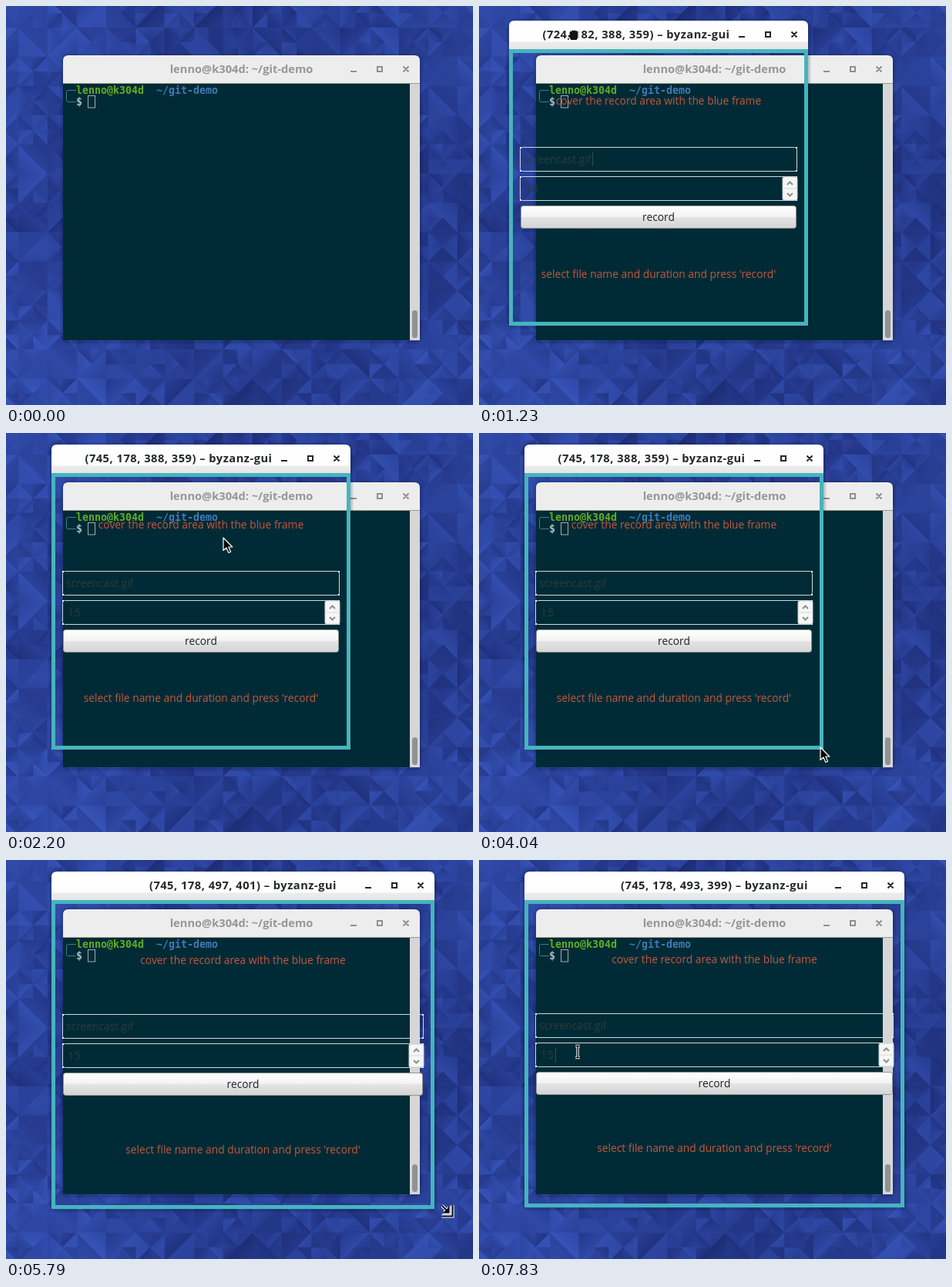
An HTML page with a canvas that plays this animation: 606 px wide and 518 px high, repeating every 8 s.

```html
<!DOCTYPE html>
<html lang="en">
<head>
<meta charset="utf-8">
<title>Screen recorder window</title>
<style>
  html, body { margin: 0; width: 100%; height: 100%; overflow: hidden; background: #2a419c; }
  canvas, svg { position: absolute; left: 0; top: 0; width: 100%; height: 100%; display: block; }
  text { font-family: "Open Sans", "Noto Sans", sans-serif; font-size: 13.8px; white-space: pre; }
  .title { font-size: 14.67px; font-weight: 700; text-anchor: middle; }
  .coords { letter-spacing: .5px; fill: #22282a; }
  .mono { font-family: "DejaVu Sans Mono", monospace; font-size: 13.3px; font-weight: 700; }
  .hint { fill: #c4583c; text-anchor: middle; }
  .entry { fill: #2e3a3c; }
  .line { fill: none; stroke: #cbdadd; }
</style>
</head>
<body>
<canvas id="wall" width="606" height="518"></canvas>
<svg viewBox="0 0 606 518" preserveAspectRatio="none">
  <defs>
    <linearGradient id="push" x2="0" y2="1">
      <stop offset="0" stop-color="#fff"/><stop offset=".48" stop-color="#f3f3f3"/>
      <stop offset=".52" stop-color="#e4e4e4"/><stop offset="1" stop-color="#d4d4d4"/>
    </linearGradient>
    <linearGradient id="bar" x2="0" y2="1">
      <stop offset="0" stop-color="#fff"/><stop offset=".72" stop-color="#fdfdfd"/>
      <stop offset=".76" stop-color="#ececec"/><stop offset="1" stop-color="#e6e6e6"/>
    </linearGradient>
  </defs>
  <g id="term"></g>
  <g id="gui"></g>
  <g id="cursor"></g>
</svg>
<script>
const LOOP = 8000;
const $ = id => document.getElementById(id);

// Wallpaper: right triangles halved at random, each with a soft gradient
function paintWall() {
  const c = $('wall').getContext('2d');
  let seed = 4711;
  const rnd = () => (seed = (seed * 16807) % 2147483647) / 2147483647;
  const light = (x, y) => .48 + .1 * Math.cos(x / 95) * Math.cos(y / 80) - .08 * x / 606;
  const shade = v => `rgb(${27 + 34 * v},${42 + 52 * v},${114 + 88 * v})`;
  const mid = (p, q) => [(p[0] + q[0]) / 2, (p[1] + q[1]) / 2];

  function tri(a, p, q, depth) {
    const m = mid(p, q);
    if (depth > 2 || depth > 0 && rnd() < .6) {
      tri(m, a, p, depth - 1);
      tri(m, q, a, depth - 1);
      return;
    }
    const v = light(...mid(a, m)) + (rnd() - .5) * .4, turn = (rnd() - .5) * .3;
    const g = c.createLinearGradient(...a, ...m);
    g.addColorStop(0, shade(v + turn));
    g.addColorStop(1, shade(v - turn));
    c.fillStyle = c.strokeStyle = g;
    c.lineWidth = .6;
    c.beginPath();
    c.moveTo(...a); c.lineTo(...p); c.lineTo(...q);
    c.closePath(); c.fill(); c.stroke();
  }

  const S = 76;
  for (let y = -10; y < 518; y += S)
    for (let x = -22; x < 606; x += S) {
      const A = [x, y], B = [x + S, y], C = [x + S, y + S], D = [x, y + S];
      if (rnd() < .5) { tri(A, B, D, 4); tri(C, D, B, 4); }
      else { tri(B, C, A, 4); tri(D, A, C, 4); }
    }
}

const rect = (x, y, w, h, attrs) => `<rect x="${x}" y="${y}" width="${w}" height="${h}" ${attrs}/>`;
const text = (x, y, cls, str, attrs = '') => `<text x="${x}" y="${y}" class="${cls}" ${attrs}>${str}</text>`;
const path = (d, attrs) => `<path d="${d}" ${attrs}/>`;
const outlined = (d, width) => path(d, `fill="none" stroke="#fff" stroke-width="${width + 2}"`) +
  path(d, `fill="none" stroke="#0a0a0a" stroke-width="${width}"`);

const shadow = (x, y, w, h) => [1, 2, 3, 4].map(i =>
  rect(x - i + .5, y - i + 1.5, w + 2 * i - 1, h + 2 * i - 1,
    `rx="${6 + i}" fill="none" stroke="#000926" stroke-opacity="${.26 - i * .05}"`)).join('');

const capShape = (x, y, w, h) =>
  `M${x} ${y + h}V${y + 7}q0-7 7-7H${x + w - 7}q7 0 7 7V${y + h}Z`;

// Minimise, maximise and close signs; x, y is the middle of the close sign
const signs = (x, y, color) => path(
  `M${x - 72} ${y + 3}h8M${x - 37} ${y - 3}h6v6h-6zM${x - 3.5} ${y - 3.5}l7 7m0-7l-7 7`,
  `fill="none" stroke="${color}" stroke-width="2"`);

function terminal() {
  return shadow(74, 64, 463, 370) +
    path(capShape(74, 64, 463, 37), 'fill="#ededed"') +
    rect(74, 100, 463, 1, 'fill="#9a9c8c"') +
    rect(74, 101, 450, 333, 'fill="#002b36"') +
    rect(524, 101, 13, 333, 'fill="#d6d6d6"') +
    rect(527, 395, 7, 36, 'rx="3.5" fill="#8f9294"') +
    text(305.5, 87, 'title', 'lenno@k304d: ~/git-demo', 'fill="#949798"') +
    signs(519, 82, '#8d9091') +
    path('M91 109.5H80.5q-2 0-2 2V122.5q0 2 2 2H91', 'fill="none" stroke="#3d7d8c"') +
    text(91, 114, 'mono', 'lenno@k304d', 'fill="#64ad1c"') +
    text(195, 114, 'mono', '~/git-demo', 'fill="#4478b4"') +
    text(91, 129, 'mono', '$', 'fill="#a9bcc4"') +
    rect(106.5, 116.5, 9, 15.5, 'fill="none" stroke="#a3adb0"');
}

// Eased moves, each [begin, end, x, y], one after another from a first point
function glide(from, moves, t) {
  let [x, y] = from;
  for (const [begin, end, toX, toY] of moves) {
    const k = Math.max(0, Math.min(1, (t - begin) / (end - begin)));
    const s = k * k * (3 - 2 * k);
    x += (toX - x) * s;
    y += (toY - y) * s;
  }
  return [x, y];
}

const APPEAR = 500, RELEASE = 1820, CLICK = 7620;
const place = t => glide([-330, -90], [[APPEAR, 1180, 38.6, 19], [1320, 1760, 59, 15]], t);
const size = t => glide([388, 359], [[4820, 5530, 497, 401], [5750, 6000, 493, 399]], t);
const mouse = t => glide([143, 34], [
  [2000, 2200, 282, 136], [2360, 2900, 488, 390], [2900, 3160, 441, 411],
  [3790, 4040, 443, 408], [4360, 4560, 441, 411],
  [4820, 5530, 564, 447], [5750, 6390, 550, 447],
  [6430, 6550, 524, 331], [6770, 7540, 128, 249]], t);

function cursorKind(t, y) {
  if (t < RELEASE) return 'hand';
  if (t > 6700 && y < 269) return 'beam';
  const atCorner = t > 3100 && t < 3900 || t > 4480 && t < 6100;
  return atCorner ? 'resize' : 'arrow';
}

const edged = 'stroke="#fff" stroke-width="1.2" stroke-linejoin="round"';
const pointers = {
  arrow: path('M0 0V16.5L4 13L6.8 19.5L9.6 18.3L6.9 12H11.8Z', `fill="#0a0a0a" ${edged}`),
  hand: path('M-6-3q0-3 2.5-2.5q1-2.5 3-1q2-1.5 3.5 .3q3-.5 3 2.5v5q0 3-2 5.2h-8q-1-2-3.5-4.5q-1.5-3 1.5-2.5z',
    `fill="#111" ${edged}`),
  resize: outlined('M2 2L9.5 9.5M10.5 3V10.5H3M15.5 1V15.5H1', 2) +
    path('M10.5 4V10.5H4Z', 'fill="#0a0a0a"') + path('M13 2V13H2', 'fill="none" stroke="#fff"'),
  beam: outlined('M-3-7.5H3M-3 7.5H3M0-7.5V7.5', 1.4)
};

// Rounded field with white dots in its square corners
function field(y, w) {
  const dots = [14, w - 16].flatMap(x => [y, y + 30].map(v => rect(x, v, 2, 2, 'fill="#fff"')));
  return dots.join('') + rect(14.5, y + .5, w - 29, 31, 'rx="3" class="line"');
}

function recorder(t) {
  if (t < APPEAR) return '';
  const [px, py] = place(t), [w, h] = size(t).map(Math.round);
  const x = Math.round(px), y = Math.round(py), grow = h - 359;
  const name = 164 + Math.floor(grow / 2), spin = name + 38, push = name + 76;
  const label = `(${Math.floor(686 + px)}, ${Math.floor(163 + py)}, ${w}, ${h}) – byzanz-gui`;
  const clicked = t >= CLICK;
  const lit = clicked || (t + 40) % 1200 < 475;
  const caret = clicked ? [40, spin + 7] : [108, name + 6];
  return `<g transform="translate(${x} ${y})">` +
    shadow(0, 0, w, h + 37) +
    path(capShape(0, 0, w, 37), 'fill="url(#bar)"') +
    text(Math.min(w / 2, w - 223), 23, 'title coords', label) +
    signs(w - 18, 18, '#22282a') +
    rect(2.5, 39.5, w - 5, h - 5, 'fill="none" stroke="#45b5bc" stroke-width="5"') +
    text(w / 2, 109 + Math.round(grow / 4), 'hint', 'cover the record area with the blue frame') +
    field(name, w) + text(19, name + 21, 'entry', 'screencast.gif') +
    field(spin, w) + text(21, spin + 21, 'entry', '15', 'letter-spacing="1"') +
    rect(w - 33, spin + 1, 19, 30, 'rx="2" fill="#f6f6f6" stroke="#c9cfcf"') +
    path(`M${w - 33} ${spin + 16}h19`, 'stroke="#d5d8d8"') +
    path(`M${w - 27} ${spin + 11}l3.5-3.5l3.5 3.5m0 11l-3.5 3.5l-3.5-3.5`,
      'fill="none" stroke="#8b9090" stroke-width="2"') +
    rect(15.5, push + .5, w - 31, 29, 'rx="3" fill="url(#push)" stroke="#8c9490"') +
    text(w / 2, push + 20, '', 'record', 'text-anchor="middle" fill="#1c2224"') +
    text(w / 2, 334 + Math.round(grow * .75), 'hint', "select file name and duration and press 'record'") +
    (lit ? rect(...caret, 1, 19, 'fill="#38484b"') : '') + '</g>';
}

function pointer(t) {
  if (t < APPEAR) return '';
  const [px, py] = place(t);
  const [x, y] = t < RELEASE ? [px + 84, py + 19] : mouse(t);
  return `<g transform="translate(${Math.round(x)} ${Math.round(y)})">${pointers[cursorKind(t, y)]}</g>`;
}

const shown = {};
function put(id, markup) {
  if (shown[id] !== markup) $(id).innerHTML = shown[id] = markup;
}

function update(t) {
  put('gui', recorder(t));
  put('cursor', pointer(t));
}

paintWall();
put('term', terminal());
const start = performance.now();
function tick() {
  update((performance.now() - start) % LOOP);
  requestAnimationFrame(tick);
}
tick();
</script>
</body>
</html>
```
